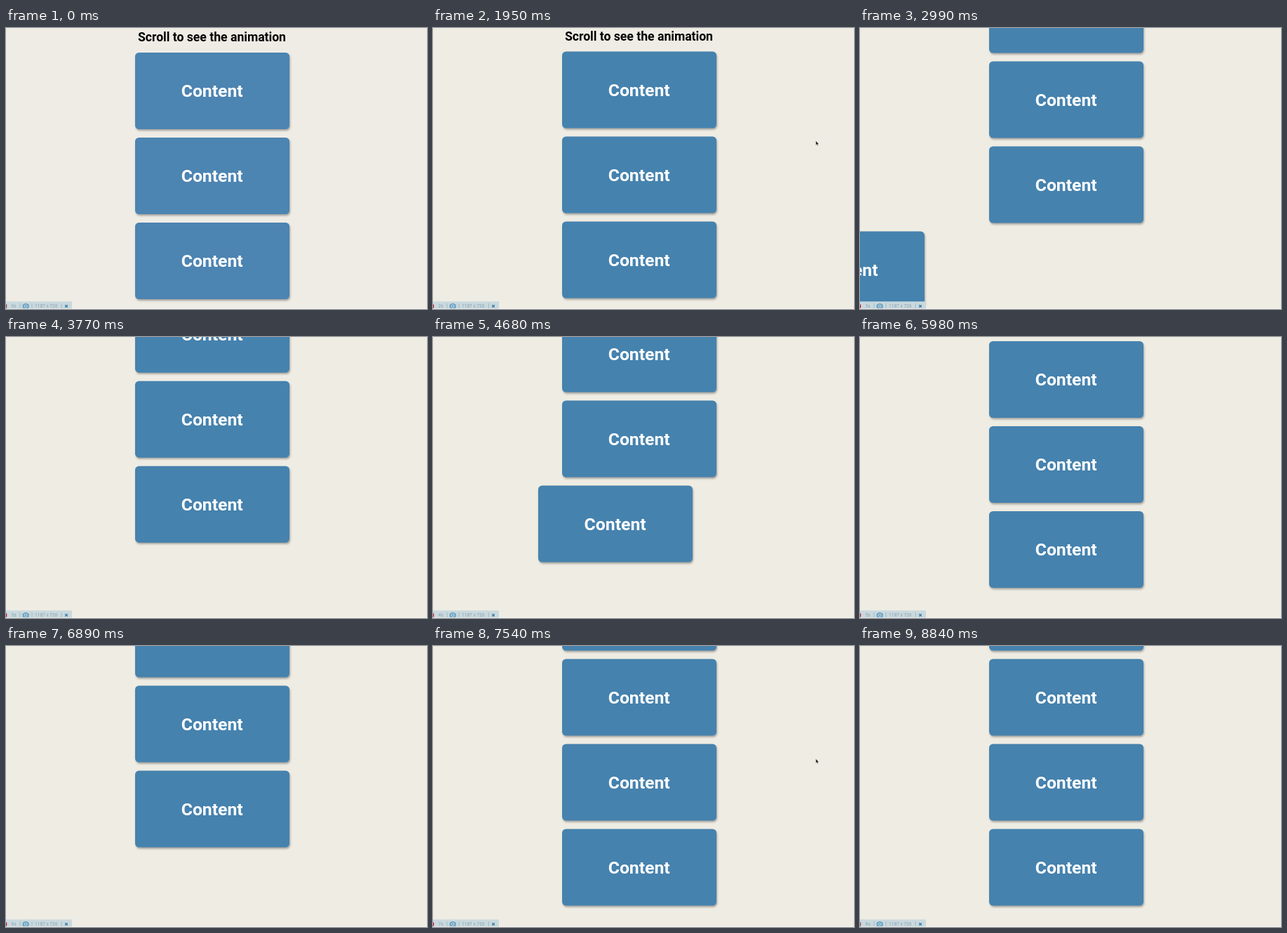
An HTML page that plays this animation: 600x400 px, repeating every 8970 ms.

```html
<!DOCTYPE html>
<html lang="en">
<head>
<meta charset="utf-8">
<title>Scroll animation</title>
<style>
  html, body { margin: 0; width: 100%; height: 100%; overflow: hidden; }
  #stage { position: relative; width: 600px; height: 400px; overflow: hidden; background: var(--bg); font-family: Roboto, sans-serif; }
  #page { position: absolute; left: 0; top: 0; width: 600px; }
  h1 { position: absolute; left: 0; top: 2.5px; width: 587px; margin: 0; text-align: center; font: bold 17.6px/20.6px Roboto, sans-serif; color: #000; }
  .box { position: absolute; left: 183.5px; width: 220.4px; height: 109.7px; border-radius: 5.5px; background: var(--box);
    box-shadow: 1.1px 2.2px 2.75px rgba(0,0,0,.3); color: #fff; text-align: center; font: bold 24.75px/110px Roboto, sans-serif; }
  #ui { position: absolute; left: 0; top: 0; }
</style>
</head>
<body>
<div id="stage">
  <div id="page"><h1>Scroll to see the animation</h1></div>
  <svg id="ui" width="600" height="400" font-family="Roboto, sans-serif" font-size="6.6" fill="#8aa3b0">
    <rect y="399" width="600" height="1" fill="#f8f7f4"/>
    <rect y="389.3" width="94" height="10.2" fill="#c9d9de"/>
    <rect y="393.5" width="1.2" height="5" fill="#c4102a"/>
    <text id="count" x="7.6" y="398.3"></text>
    <path d="M20 392v7M37 392v7M79.3 392v7" stroke="#93adba" stroke-width=".7"/>
    <rect x="23.6" y="393" width="9.2" height="6" rx="1.5" fill="#6fa3c2"/>
    <rect x="26" y="392" width="4.4" height="2" rx=".7" fill="#6fa3c2"/>
    <circle cx="28.2" cy="396" r="1.9" fill="#6fa3c2" stroke="#dbe8ee" stroke-width=".8"/>
    <text x="41" y="398.3">1187 x 726</text>
    <path d="M84.2 394.2l3.6 3.6m0-3.6l-3.6 3.6" stroke="#3a7aa6" stroke-width="1.3"/>
    <path id="cursor" d="M0 0v6.4l1.5-1.3 1 2.2 1.1-.5-1-2.1h2z" fill="#222" stroke="#fff" stroke-width=".4"/>
  </svg>
</div>
<script>
const LOOP = 8970, STEP = 130, SLIDE = 416, TRIGGER = 320, SIDE = 880;
const $ = id => document.getElementById(id);

// time in ms, scroll offset in px
const scrollKeys = [[1820, 0], [1950, 1.5], [2834, 77.5], [2990, 108.5], [3680, 198.5], [4367, 319.5],
  [4680, 428.5], [5450, 440.5], [5980, 513], [6390, 561.5], [6800, 682.5], [6890, 704.5], [7540, 742.5]];

const clamp = v => Math.max(0, Math.min(1, v));
const mix = (a, b, k) => a + (b - a) * k;

function scrollAt(t) {
  let y = 0;
  for (let i = 1; i < scrollKeys.length; i++) {
    const [t0, y0] = scrollKeys[i - 1], [t1, y1] = scrollKeys[i];
    if (t >= t0) y = mix(y0, y1, clamp((t - t0) / (t1 - t0)));
  }
  return y;
}

// cubic-bezier(.25, .1, .25, 1)
function ease(x) {
  let lo = 0, hi = 1;
  for (let i = 0; i < 20; i++) {
    const u = (lo + hi) / 2;
    if (.75 * u * (1 - u) + u ** 3 < x) lo = u; else hi = u;
  }
  const u = (lo + hi) / 2;
  return .3 * u * (1 - u) ** 2 + 3 * u * u * (1 - u) + u ** 3;
}

const boxes = Array.from({ length: 10 }, (_, i) => {
  const el = document.createElement('div'), top = 34.5 + 121 * i;
  el.className = 'box';
  el.textContent = 'Content';
  el.style.top = top + 'px';
  $('page').append(el);
  let start = top < TRIGGER ? -SLIDE : 0;
  while (start >= 0 && start < LOOP && top - scrollAt(start) > TRIGGER + .01) start++;
  return { el, start, from: i % 2 ? -SIDE : SIDE };
});

function draw(t) {
  const style = $('stage').style, early = t < 520;
  style.setProperty('--bg', early ? '#efece5' : '#eeece3');
  style.setProperty('--box', early ? '#4c84b2' : '#4582ae');
  $('page').style.transform = `translateY(${-scrollAt(t)}px)`;
  for (const { el, start, from } of boxes) {
    const left = 1 - ease(clamp((t - start) / SLIDE));
    el.style.transform = left > .001 ? `translateX(${from * left}px)` : 'none';
  }
  $('count').textContent = Math.floor((t + 130) / 1040) + 's';

  const away = t < 4000 ? ease(clamp(t / 910)) : 1 - ease(clamp((t - 8060) / 780));
  $('cursor').setAttribute('transform', `translate(${mix(-2.5, 545.5, away)} ${mix(392.5, 160.5, away)})`);
  $('cursor').style.display = t > 1950 && t < 7540 ? 'none' : '';
}

const begin = performance.now();
function tick() {
  const t = (performance.now() - begin) % LOOP;
  draw(Math.floor(t / STEP) * STEP);
  requestAnimationFrame(tick);
}
tick();
</script>
</body>
</html>
```
